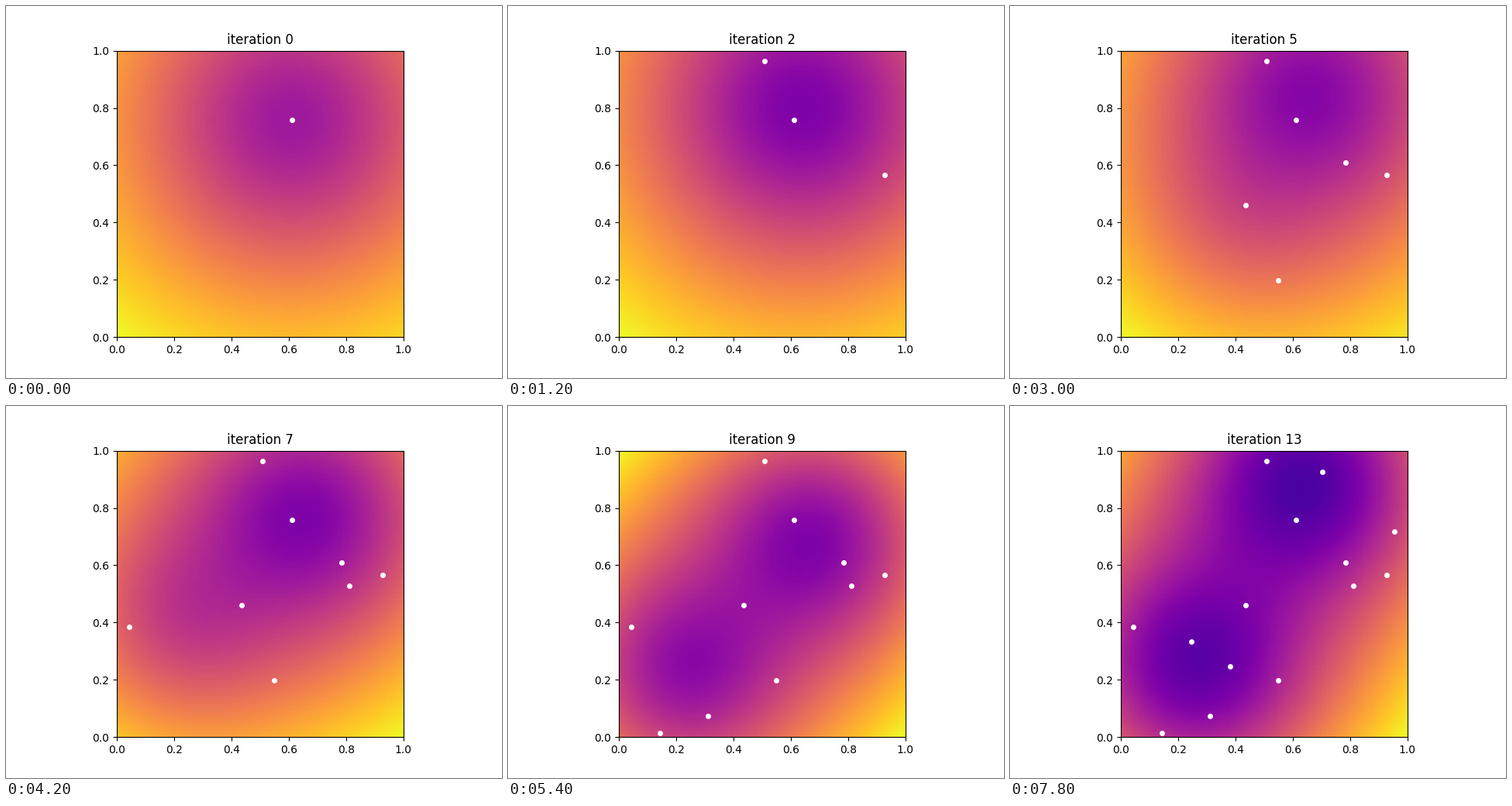
A matplotlib script for the animation above (8000 ms loop, 640 by 480 pixels).

```python
import numpy as np
import matplotlib.pyplot as plt
from matplotlib.animation import FuncAnimation

STEP_MS = 200
HOLD = 3          # animation frames per iteration
FRAMES = 40
CELLS = 100
SPREAD = 0.19     # squared width of a well

# One new sample per iteration
SAMPLES = np.array([
    (0.611, 0.757), (0.508, 0.963), (0.928, 0.565), (0.435, 0.460),
    (0.549, 0.198), (0.785, 0.608), (0.812, 0.527), (0.043, 0.386),
    (0.311, 0.073), (0.143, 0.014), (0.246, 0.332), (0.955, 0.717),
    (0.381, 0.246), (0.703, 0.925),
])

# Path of the main well: iteration, x, y, lowest value
PATH = np.array([
    (0, 0.61, 0.757, 0.34), (2, 0.64, 0.80, 0.25), (4, 0.66, 0.89, 0.28),
    (7, 0.66, 0.77, 0.25), (9, 0.68, 0.69, 0.25), (11, 0.72, 0.74, 0.18),
    (13, 0.64, 0.89, 0.12),
])

axis = (np.arange(CELLS) + 0.5) / CELLS
X, Y = np.meshgrid(axis, axis)


def well(x, y):
    """Heavy-tailed bump centred on (x, y)."""
    return (1 + ((X - x) ** 2 + (Y - y) ** 2) / SPREAD) ** -1.5


def field(n):
    x, y, low = (np.interp(n, PATH[:, 0], col) for col in PATH[:, 1:].T)
    density = well(x, y)

    # Samples on the lower left build up a second well around their mean
    seen = SAMPLES[:n + 1]
    left = seen[(seen < 0.5).all(axis=1)]
    if len(left):
        density += 0.9 * min(1, len(left) / 4) * well(*left.mean(axis=0))

    z = -np.log(density)
    return low + (1 - low) * (z - z.min()) / np.ptp(z)


fig, ax = plt.subplots(figsize=(6.4, 4.8), dpi=100)
image = ax.imshow(field(0), cmap="plasma", vmin=0, vmax=1,
                  origin="lower", extent=(0, 1, 0, 1))
dots, = ax.plot([], [], "wo", markersize=4)
title = ax.set_title("iteration 0")
ax.set_xlim(0, 1)
ax.set_ylim(0, 1)


def draw(i):
    n = i // HOLD
    image.set_data(field(n))
    dots.set_data(*SAMPLES[:n + 1].T)
    title.set_text(f"iteration {n}")
    return image, dots, title


anim = FuncAnimation(fig, draw, frames=FRAMES, interval=STEP_MS,
                     repeat=True, repeat_delay=0, blit=False)
plt.show()
```
